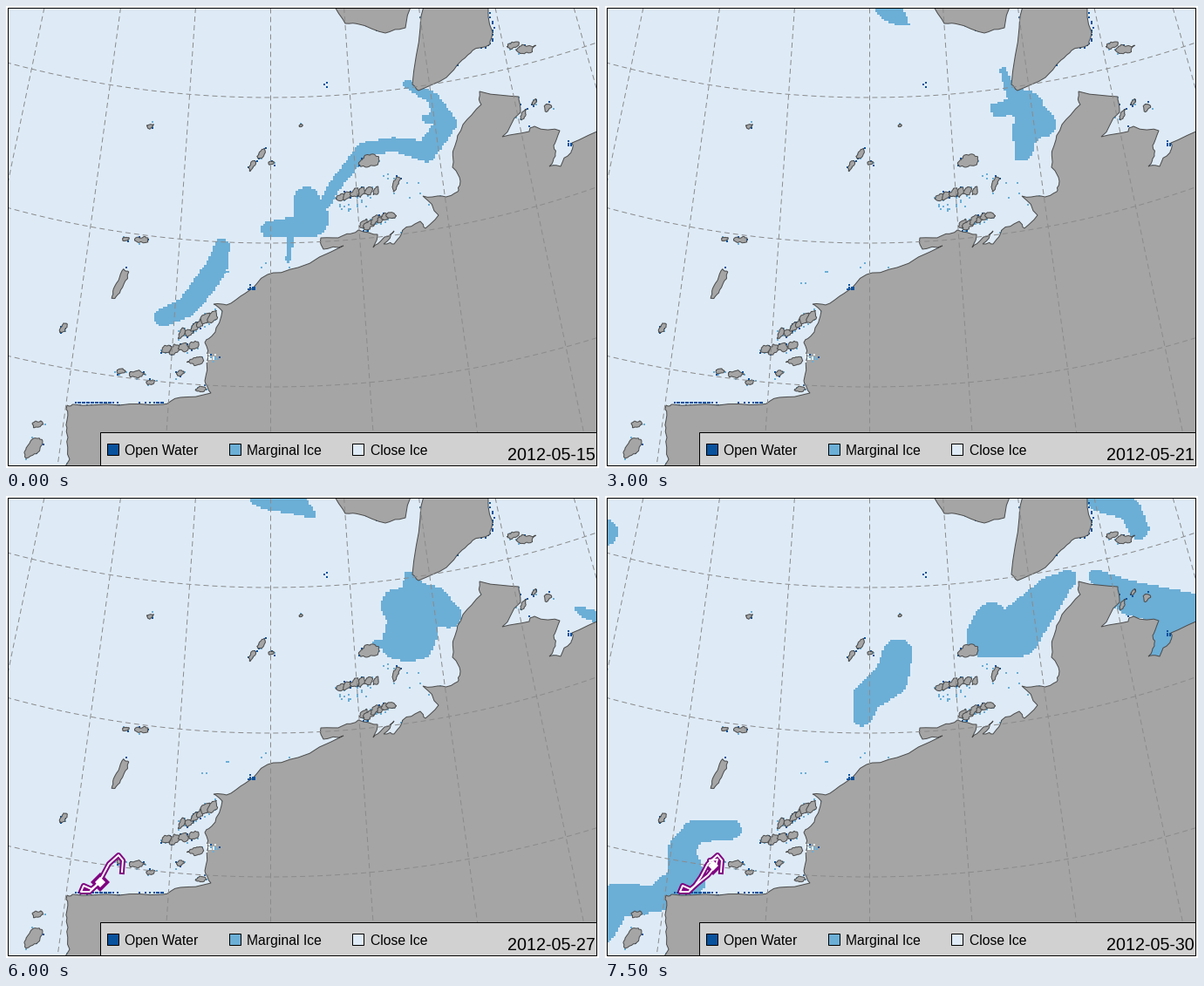
Animation, 680 px wide and 530 px high, one loop 8000 ms. Source, as a matplotlib script:

```python
import numpy as np
import matplotlib.pyplot as plt
from matplotlib.animation import FuncAnimation
from matplotlib.colors import ListedColormap
from matplotlib.patches import Polygon, Rectangle

W, H, PX = 680, 530, 0.72          # PX: points per pixel at 100 dpi
OPEN, MARGINAL, CLOSE = "#08519c", "#6baed6", "#deebf7"
LAND, SHORE, GRID, TRACK = "#a5a5a5", "#4c4c4c", "#8b8b8b", "#800080"
FIRST_DAY, DAYS, CELL = 15, 16, 2.5
rng = np.random.default_rng(12)

fig = plt.figure(figsize=(6.8, 5.3), dpi=100, facecolor="white")
ax = fig.add_axes([2 / W, 2 / H, 676 / W, 526 / H], facecolor=CLOSE)
for spine in ax.spines.values():
    spine.set_visible(False)
ax.set_xticks([])
ax.set_yticks([])


def rows(n, *values):
    return np.array(values, float).reshape(-1, n)


def cells(xy, color, size=2.4, z=2):
    """Single grid cells of the ice chart."""
    x, y = np.round(np.asarray(xy) / CELL).T * CELL
    ax.scatter(x, y, s=(size * PX) ** 2, marker="s", c=color, lw=0, zorder=z)


def specks(pts, n, jitter, color, z=2):
    """Scatter cells along a polyline."""
    pts = np.asarray(pts, float)
    at, k = rng.uniform(0, len(pts) - 1, n), np.arange(len(pts))
    line = np.column_stack([np.interp(at, k, pts[:, i]) for i in (0, 1)])
    cells(line + rng.normal(0, jitter, line.shape), color, z=z)


# --- land -------------------------------------------------------------
def rough(pts, amp):
    """Split every edge once and nudge the middle, for a ragged shore."""
    nxt = np.roll(pts, -1, axis=0)
    size = np.minimum(np.hypot(*(nxt - pts).T) * 0.22, amp)[:, None]
    mid = (pts + nxt) / 2 + rng.uniform(-1, 1, pts.shape) * size
    return np.stack([pts, mid], 1).reshape(-1, 2)


def land(pts, amp=1.5, wet=0.15):
    """Ragged polygon with a share of its shore in open or marginal water."""
    shore = rough(rough(pts, amp), amp * 0.7)
    ax.add_patch(Polygon(shore, fc=LAND, ec=SHORE, lw=PX, zorder=3))
    damp = shore[rng.random(len(shore)) < wet]
    damp = damp + rng.normal(0, 1.2, damp.shape)
    cells(damp[::2], MARGINAL)
    cells(damp[1::2], OPEN)


def isle(x, y, rx, ry):
    """Irregular blob leaning to the right."""
    a = np.linspace(0, 2 * np.pi, 9, endpoint=False)
    r = rng.uniform(0.65, 1.2, a.size)
    dx, dy = rx * r * np.cos(a), ry * r * np.sin(a)
    land(np.column_stack([x + dx - 0.4 * dy, y + dy]), 1.3)


def cluster(start, end, n, spread, size):
    """Small isles strung between two points."""
    for t in np.linspace(0, 1, n):
        x, y = (1 - t) * np.array(start) + t * np.array(end)
        isle(x, y + rng.uniform(-spread, spread), *rng.uniform(0.6, 1.1, 2) * size)


west_shore = rows(2, 60, 540, 73, 520, 71, 495, 70, 475, 70, 458, 77, 457,
                  130, 458, 180, 457, 200, 449, 235, 444, 228, 430, 232, 402,
                  228, 386, 240, 374, 248, 350, 238, 342, 258, 341, 278, 327,
                  300, 308, 335, 300, 387, 275, 364, 279, 361, 266, 385, 264,
                  404, 257, 426, 262, 421, 277, 434, 265, 445, 258, 433, 273,
                  445, 273, 455, 257, 475, 247, 481, 255, 496, 240, 478, 218)
east_shore = rows(2, 500, 218, 518, 213, 521, 201, 512, 185, 515, 160, 524, 136,
                  545, 113, 543, 98, 588, 104, 590, 122, 569, 150, 600, 144,
                  606, 138, 635, 143, 628, 160, 630, 172, 623, 184, 636, 184,
                  648, 168, 649, 157, 690, 138, 690, 540)
land(np.vstack([west_shore, east_shore]), 2, wet=0.1)
land(rows(2, 374, -5, 389, 20, 405, 21, 435, 31, 458, 25, 464, -5))
land(rows(2, 479, -5, 475, 25, 466, 90, 473, 97, 505, 82, 523, 62, 535, 51,
          555, 44, 558, 30, 551, -5))

for blob in [(581, 45, 6, 5), (596, 49, 11, 5), (606, 110, 3, 3), (593, 125, 3, 6),
             (621, 116, 4, 5), (165, 138, 4, 3), (338, 137, 2, 2), (293, 170, 4, 7),
             (282, 183, 3, 6), (304, 180, 3, 2), (415, 178, 11, 7), (447, 204, 4, 9),
             (137, 267, 5, 2), (155, 268, 11, 4), (131, 318, 5, 17), (66, 369, 4, 6),
             (132, 419, 5, 3), (149, 422, 9, 4), (166, 432, 5, 3), (200, 421, 4, 3),
             (218, 407, 9, 5), (223, 440, 6, 3), (33, 506, 9, 14), (37, 480, 7, 4)]:
    isle(*blob)
cluster((384, 220), (424, 211), 6, 2, 5)
cluster((410, 249), (442, 242), 6, 3, 6)
cluster((184, 393), (214, 391), 4, 2, 6)
cluster((202, 374), (237, 358), 6, 4, 7)

specks([(78, 455), (105, 456), (130, 457), (160, 457), (180, 456)], 170, 0.5, OPEN)
specks([(548, 47), (558, 40), (558, 25), (555, 8)], 30, 0.8, OPEN)
specks([(279, 324), (284, 322)], 22, 1.5, OPEN, 3.5)
specks([(645, 160), (648, 156)], 16, 1.2, OPEN, 3.5)
specks([(366, 88), (367, 91)], 4, 0.8, OPEN)
specks([(375, 225), (405, 228), (450, 194), (485, 230)], 26, 5, MARGINAL)
specks([(210, 327), (260, 300), (332, 292)], 6, 3, MARGINAL)
for color in (OPEN, MARGINAL, "#e8f8ff"):
    specks([(233, 403), (238, 403)], 12, 2.5, color, 3.5)

# --- marginal ice: tapered strokes of (x, y, radius) on surveyed days --
strokes = {}


def ice(day, *xyr):
    strokes.setdefault(day, []).append(rows(3, *xyr))


ice(15, 461, 90, 5, 490, 106, 7, 505, 135, 12, 482, 167, 12, 445, 159, 8,
    410, 165, 8, 376, 208, 7, 366, 228, 6)
ice(15, 482, 129, 5, 500, 130, 8)
ice(15, 345, 223, 15, 350, 244, 21, 340, 252, 13, 302, 257, 9)
ice(15, 327, 262, 4, 324, 291, 3)
ice(15, 248, 276, 9, 243, 298, 12, 230, 317, 13, 208, 345, 12, 180, 358, 10)

ice(17, 462, 90, 5, 490, 106, 8, 507, 128, 9, 484, 166, 11, 440, 162, 5)
ice(17, 393, 195, 4, 366, 224, 17, 365, 243, 18)
ice(17, 350, 228, 17, 318, 228, 14, 298, 250, 13, 303, 272, 9)
ice(17, 332, 3, 8)

ice(19, 315, 2, 8, 355, 26, 15, 392, 23, 4)
ice(19, 457, 70, 3, 466, 95, 5, 484, 115, 17, 482, 135, 19, 483, 160, 10)
ice(19, 486, 130, 20, 504, 135, 13)
ice(19, 470, 116, 10, 446, 128, 8, 446, 137, 5)

ice(23, 4, 4, 14)
ice(23, 328, 3, 15)
ice(23, 456, 76, 5, 463, 100, 7, 488, 113, 15, 503, 137, 15, 480, 150, 13,
    479, 173, 13, 437, 183, 6)
ice(23, 470, 114, 9, 432, 114, 5)
ice(23, 655, 140, 3, 680, 139, 5)
ice(23, 333, 253, 16, 362, 250, 13)
ice(23, 247, 288, 6, 242, 315, 5)
ice(23, 225, 324, 6, 206, 355, 7)
ice(23, 180, 370, 5, 163, 395, 8, 163, 412, 8)
ice(23, 116, 339, 11, 120, 361, 12)
ice(23, 4, 494, 11)

ice(25, 0, 0, 33, 33, 2, 9)
ice(25, 299, 6, 18, 328, 5, 18)
ice(25, 440, 55, 4, 455, 85, 6, 462, 100, 7, 484, 112, 15, 486, 140, 17,
    477, 172, 15, 442, 178, 9)
ice(25, 488, 118, 18, 507, 136, 15)
ice(25, 465, 109, 8, 441, 111, 8)
ice(25, 663, 139, 5, 680, 138, 7)

ice(28, 285, 2, 6, 335, 10, 11, 366, 32, 8)
ice(28, 562, 10, 6, 590, 28, 5, 610, 44, 7)
ice(28, 556, 77, 12, 575, 88, 8, 615, 100, 7, 640, 122, 7, 680, 140, 6)
ice(28, 466, 93, 7, 470, 130, 27, 448, 135, 25, 456, 163, 27, 465, 162, 28)
ice(28, 490, 122, 17, 508, 137, 15)
ice(28, 425, 168, 10, 395, 195, 12, 372, 235, 12, 342, 246, 14)
ice(28, 338, 127, 12)
ice(28, 243, 211, 9, 264, 225, 13, 275, 260, 9, 290, 296, 5)
ice(28, 270, 218, 11, 290, 216, 8)
ice(28, 169, 270, 3, 147, 310, 10, 120, 365, 20, 125, 395, 20, 149, 411, 6)
ice(28, 0, 342, 7, 45, 327, 12, 74, 336, 10, 95, 375, 22, 92, 394, 21)
ice(28, 80, 402, 13, 40, 408, 20, 0, 402, 14)
ice(28, 48, 425, 20, 43, 458, 22, 8, 456, 16, 5, 505, 10)

ice(30, 0, 42, 15)
ice(30, 565, 5, 12, 602, 16, 13, 612, 38, 12)
ice(30, 562, 92, 8, 605, 118, 20, 668, 132, 21, 640, 155, 18, 636, 176, 14)
ice(30, 444, 144, 21, 437, 163, 23, 472, 156, 29, 512, 110, 18, 531, 95, 10)
ice(30, 336, 181, 17, 328, 210, 20, 302, 230, 17, 296, 252, 12)
ice(30, 146, 383, 11, 103, 385, 13, 88, 405, 15, 94, 440, 22, 60, 462, 15,
    12, 465, 20, 0, 500, 12)

gx, gy = np.meshgrid(np.arange(0, W, CELL) + CELL / 2,
                     np.arange(0, H, CELL) + CELL / 2)


def depth(stroke):
    """How far each cell lies inside a stroke; negative outside."""
    best = np.full(gx.shape, -1e3)
    for (x, y, r), (x2, y2, r2) in zip(stroke, np.vstack([stroke[1:], stroke[-1:]])):
        dx, dy = x2 - x, y2 - y
        t = np.clip(((gx - x) * dx + (gy - y) * dy) / (dx * dx + dy * dy + 1e-9), 0, 1)
        gap = np.hypot(gx - x - t * dx, gy - y - t * dy)
        best = np.maximum(best, r + t * (r2 - r) - gap)
    return best


fields = {d: np.max([depth(s) for s in group], axis=0) for d, group in strokes.items()}


def ice_mask(day):
    """Blend the two nearest surveys and keep the inside."""
    lo = max(d for d in fields if d <= day)
    hi = min(d for d in fields if d >= day)
    t = (day - lo) / max(hi - lo, 1)
    return np.ma.masked_less((1 - t) * fields[lo] + t * fields[hi], 0) * 0


ice_img = ax.imshow(ice_mask(FIRST_DAY), cmap=ListedColormap([MARGINAL]), vmin=0,
                    vmax=1, extent=(0, W, H, 0), aspect="auto",
                    interpolation="nearest", zorder=1)

# --- graticule ----------------------------------------------------------
POLE = -1240
dash = dict(color=GRID, lw=PX, ls=(0, (6, 4)), zorder=4)
for k in range(-3, 5):
    slope = np.tan(np.radians(3.92 * k))
    ax.plot([302.5 + slope * (y - POLE) for y in (2, 528)], [2, 528], **dash)
xs = np.linspace(0, W, 200)
for y0, r in ((105, 1150), (272, 1130), (437, 1280)):
    ax.plot(xs, y0 - r + np.sqrt(r * r - (xs - 302) ** 2), **dash)

# --- track: two points a day ----------------------------------------------
TRACK_DAY = 22
route = rows(2, 133, 431, 134, 418, 129, 412, 118, 422, 110, 437, 103, 447,
             98, 451, 89, 447, 86, 454, 96, 454, 101, 449, 108, 443,
             113, 439, 118, 435, 127, 424, 129, 417, 120, 418, 124, 424)
lines = [ax.plot([], [], color=c, lw=w * PX, solid_joinstyle="round", zorder=z)[0]
         for c, w, z in ((TRACK, 6, 5), ("white", 2, 6))]
marks = [ax.plot([], [], marker="D", ms=s * PX, mew=0, color=c, zorder=z)[0]
         for c, s, z in ((TRACK, 15, 5), ("white", 9, 6))]

# --- legend and frame -----------------------------------------------------
ax.add_patch(Rectangle((108, 489), 569, 38, fc="#d1d1d1", ec="black", lw=PX, zorder=8))
ax.add_patch(Rectangle((2, 2), 675, 525, fill=False, ec="black", lw=PX, zorder=10))
for x, color, label in ((116, OPEN, "Open Water"), (256, MARGINAL, "Marginal Ice"),
                        (397, CLOSE, "Close Ice")):
    ax.add_patch(Rectangle((x, 502), 13, 13, fc=color, ec="black", lw=PX, zorder=9))
    ax.text(x + 20.5, 515, label, size=15.7 * PX, family="Liberation Sans", zorder=9)
date = ax.text(676, 521, "", size=19.7 * PX, family="Liberation Sans",
               ha="right", zorder=9)

ax.set_xlim(2, 678)
ax.set_ylim(528, 2)


def update(i):
    day = FIRST_DAY + i
    ice_img.set_data(ice_mask(day))
    path = route[:max(0, 2 * (day - TRACK_DAY + 1))]
    for line in lines:
        line.set_data(path[:, 0], path[:, 1])
    for mark in marks:
        mark.set_data(path[-1:, 0], path[-1:, 1])
    date.set_text(f"2012-05-{day}")
    return [ice_img, date, *lines, *marks]


anim = FuncAnimation(fig, update, frames=DAYS, interval=500, repeat=True)
plt.show()
```
